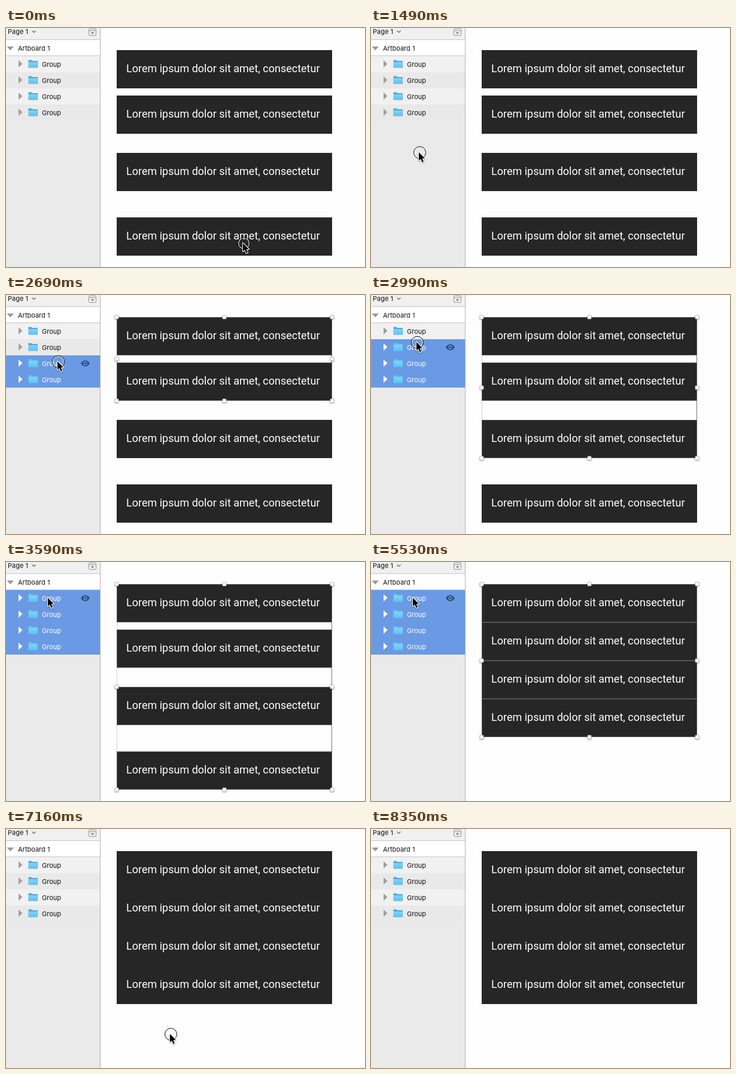
These frames come from a looping animation (600x400 px, 8650 ms). An HTML page:

```html
<!DOCTYPE html>
<html lang="en">
<head>
<meta charset="utf-8">
<title>Layer list</title>
<style>
  html, body { margin: 0; width: 100%; height: 100%; overflow: hidden; background: #fefefe; }
  svg { display: block; width: 600px; height: 400px; }
  .ui { font: 11px Inter, sans-serif; fill: #111; }
  .copy { font: 18px Roboto, sans-serif; fill: #fff; }
</style>
</head>
<body>
<svg viewBox="0 0 600 400">
  <defs>
    <linearGradient id="blue" x2="0" y2="1"><stop stop-color="#7fd4fa"/><stop offset="1" stop-color="#62c0f2"/></linearGradient>
    <filter id="shade" x="-50%" y="-50%" width="200%" height="200%">
      <feDropShadow dx="0" dy="1" stdDeviation=".8" flood-opacity=".4"/>
    </filter>
    <g id="folder">
      <path d="M.5 13.5V1Q.5.5 1 .5H5.5L7 2H15.5Q16 2 16 2.5V13.5Z" fill="currentColor"/>
      <path d="M1 4H15.5V13H1Z" fill="url(#blue)"/>
    </g>
    <g id="eye">
      <path d="M-7.5 0Q-4-5 0-5T7.5 0Q4 5 0 5T-7.5 0Z" fill="#2c4a78"/>
      <circle r="3.2" fill="#6a9ae3"/><circle r="1.8" fill="#2c4a78"/>
    </g>
    <rect id="handle" x="-3" y="-3" width="6" height="6" rx=".5" fill="#fff" stroke="#b0b0b0" stroke-width=".8" filter="url(#shade)"/>
    <path id="arrow" d="M0 0V14L3.2 11.2 5.6 16.8 8 15.8 5.6 10.3H10Z" fill="#000" stroke="#fff" stroke-width="2" paint-order="stroke" stroke-linejoin="round" filter="url(#shade)"/>
    <g id="ring" fill="none">
      <circle r="9" stroke="#fff" stroke-width="1.2"/><circle r="10" stroke="#000"/>
    </g>
  </defs>
  <rect width="157" height="400" fill="#eaeaea"/>
  <rect width="157" height="19" fill="#f0f0f0"/>
  <rect y="20" width="157" height="26" fill="#fff"/>
  <path d="M0 19.5H157M0 46.5H157" stroke="#c6c6c6"/>
  <text class="ui" x="3" y="10">Page 1</text>
  <path d="M43.5 4.5 46.5 7.5 49.5 4.5" fill="none" stroke="#666" stroke-width="1.2"/>
  <rect x="138.5" y="1.5" width="12" height="11" rx="1.5" fill="none" stroke="#999"/>
  <path d="M139 4.5H150" stroke="#999"/>
  <path d="M141.5 7H147.5L144.5 10.5Z" fill="#888"/>
  <path d="M1.5 31H13L7.2 37.5Z" fill="#9a9a9a"/>
  <text class="ui" x="20" y="38">Artboard 1</text>
  <g id="live"></g>
  <path d="M157.5 0V400" stroke="#b5b5b5"/>
  <g id="pointer"></g>
</svg>
<script>
const LOOP = 8650, TICKS = 58;   // all times below are in ticks
const ROW = 27, TOP = 47, X = 185, W = 360, H = 64;
const SPREAD = [37, 113, 209, 317];
const STACKED = SPREAD.map((_, i) => 37 + i * H);
const live = document.getElementById('live');
const pointer = document.getElementById('pointer');

const start = [397.5, 360.5];
// from, to, x, y
const moves = [
  [0, 2, 440.5, 379.5],
  [5, 6, 465.5, 386],
  [6, 10, 81.5, 208.5],
  [14, 16, 88.5, 141],
  [16, 18, 87.5, 111.5],
  [18, 21.4, 71.5, 60.5],
  [42, 47, 275.5, 343.5],
  [54, 55, 362.5, 363]
];
const presses = [[0, 1], [10, 13], [16, 24], [48, 49]];

function pointerAt(n) {
  let [x, y] = start;
  for (const [from, to, toX, toY] of moves) {
    const u = Math.min(1, Math.max(0, (n - from) / (to - from)));
    const ease = u * u * (3 - 2 * u);
    x += (toX - x) * ease;
    y += (toY - y) * ease;
  }
  return [x, y];
}

// blocks join the selection one by one while the pointer climbs the list
const selectedAt = n => n < 16 || n >= 48 ? 0 : Math.min(4, 1 + Math.floor((n - 16) / 1.6));

const use = (id, x, y) => `<use href="#${id}" x="${x}" y="${y}"/>`;

function layer(i, selected, hovered) {
  const y = TOP + i * ROW;
  const fill = selected ? '#6a9ae3' : i % 2 ? '#e9e9e9' : '#f1f1f1';
  return `<rect y="${y}" width="157" height="${ROW}" fill="${fill}"/>
    <path d="M21 ${y + 7}V${y + 19}L27.5 ${y + 13}Z" fill="${selected ? '#fff' : '#a0a0a0'}"/>
    <g color="${selected ? '#62cdf2' : '#4fa9dc'}">${use('folder', 37, y + 6)}</g>
    <text class="ui" x="60" y="${y + 18}" ${selected ? 'style="fill:#fff"' : ''}>Group</text>
    ${selected && hovered ? use('eye', 132.5, y + 13.5) : ''}`;
}

function block(y, selected) {
  const edge = `<rect x="${X + .5}" y="${y + .5}" width="${W - 1}" height="${H - 1}" fill="none" stroke="#555"/>`;
  return `<rect x="${X}" y="${y}" width="${W}" height="${H}" fill="#262626"/>
    <text class="copy" x="201" y="${y + 37}">Lorem ipsum dolor sit amet, consectetur</text>
    ${selected ? edge : ''}`;
}

const sides = (top, bottom) =>
  `<path d="M${X + .5} ${top}V${bottom}" stroke="#d4d4d4"/>
   <path d="M${X + W - .5} ${top}V${bottom}" stroke="#777"/>`;

function handles(top, bottom) {
  let out = '';
  for (let k = 0; k < 9; k++) {
    const x = X + k % 3 * W / 2, y = top + Math.floor(k / 3) * (bottom - top) / 2;
    if (k !== 4) out += use('handle', x, y);
  }
  return out;
}

function draw(n) {
  const [x, y] = pointerAt(n);
  const count = selectedAt(n);
  const tops = n < 37 ? SPREAD : STACKED;
  const span = count ? [tops[0], tops[count - 1] + H] : null;
  const hover = x < 157 ? Math.floor((y - TOP) / ROW) : -1;
  const pressed = presses.some(([from, to]) => n >= from && n < to);
  live.innerHTML = tops.map((_, i) => layer(i, i >= 4 - count, i === hover)).join('')
    + (span ? sides(...span) : '')
    + tops.map((top, i) => block(top, i < count)).join('')
    + (span ? handles(...span) : '');
  pointer.innerHTML = n < 56 ? (pressed ? use('ring', x, y) : '') + use('arrow', x - 1.5, y - .5) : '';
}

let shown;
function frame() {
  const n = Math.floor(performance.now() % LOOP / LOOP * TICKS + .04) % TICKS;
  if (n !== shown) draw(shown = n);
  requestAnimationFrame(frame);
}
frame();
</script>
</body>
</html>
```
